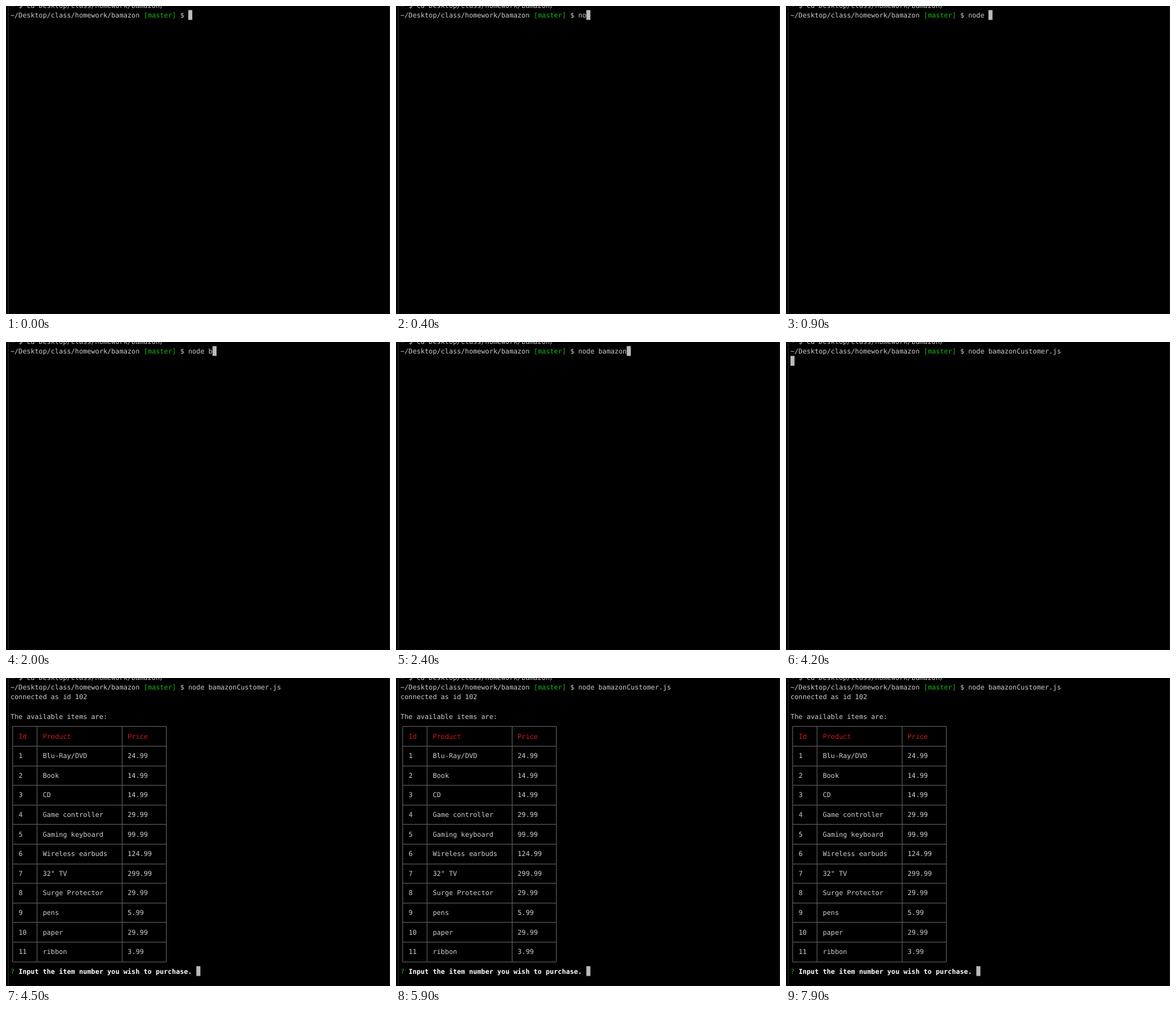
An HTML page that plays this animation: 600x481 px, repeating every 8000 ms.

```html
<!DOCTYPE html>
<html lang="en">
<head>
<meta charset="utf-8">
<title>Terminal session</title>
<style>
  html, body { margin: 0; width: 100%; height: 100%; overflow: hidden; background: #000; }
  svg { display: block; width: 600px; height: 481px; }
  text {
    font: 10.486px "DejaVu Sans Mono", "Liberation Mono", monospace;
    text-rendering: geometricPrecision;
    white-space: pre;
    fill: #cecece;
  }
  .green { fill: #14bf14; }
  .red { fill: #d41a12; }
  .bold { fill: #fff; font-weight: bold; }
  .grid { fill: none; stroke: #5e5e5e; }
</style>
</head>
<body>
<svg id="stage" viewBox="0 0 600 481">
  <rect width="600" height="481" fill="#000"/>
  <path d="M3.5 0V481" stroke="#2c2c2c"/>
  <path d="M599.5 0V481" stroke="#1c1a18"/>
  <path d="M0 480.5H600" stroke="#140404"/>
</svg>
<script>
const LOOP = 8000;
const LEFT = 7, CELL = 6.313, LINE = 15.3, TOP = 6.4, BASE = 18, MIDDLE = 14.2;
const PROMPT_COLS = 44;
const COMMAND = 'node bamazonCustomer.js ';
const ENTER = 4200, OUTPUT = 4500;

// [time, characters typed so far]
const KEYS = [[0, 0], [200, 1], [400, 2], [600, 3], [700, 4], [900, 5], [2000, 6],
  [2200, 7], [2400, 12], [3300, 13], [3400, 14], [3600, 24]];

const ITEMS = [
  ['Id', 'Product', 'Price'],
  ['1', 'Blu-Ray/DVD', '24.99'],
  ['2', 'Book', '14.99'],
  ['3', 'CD', '14.99'],
  ['4', 'Game controller', '29.99'],
  ['5', 'Gaming keyboard', '99.99'],
  ['6', 'Wireless earbuds', '124.99'],
  ['7', '32" TV', '299.99'],
  ['8', 'Surge Protector', '29.99'],
  ['9', 'pens', '5.99'],
  ['10', 'paper', '29.99'],
  ['11', 'ribbon', '3.99']
];
const BORDERS = [0, 6, 27, 38];
const TABLE_ROW = 4, QUESTION_ROW = 29;

const stage = document.getElementById('stage');
const colX = col => LEFT + col * CELL;
const snap = v => Math.round(v) + 0.5;

function add(parent, tag, attrs) {
  const el = document.createElementNS('http://www.w3.org/2000/svg', tag);
  for (const key in attrs) el.setAttribute(key, attrs[key]);
  return parent.appendChild(el);
}

function write(parent, row, col, string, style = '') {
  const el = add(parent, 'text', { x: colX(col), y: BASE + row * LINE, class: style });
  el.textContent = string;
  return el;
}

function drawTable(parent) {
  const xs = BORDERS.map(col => snap(colX(col + 0.5)));
  const ys = Array.from({ length: ITEMS.length + 1 },
    (_, i) => snap(MIDDLE + (TABLE_ROW + 2 * i) * LINE));
  const right = xs[xs.length - 1], bottom = ys[ys.length - 1];
  const d = ys.map(y => `M${xs[0]} ${y}H${right}`).join('') +
    xs.map(x => `M${x} ${ys[0]}V${bottom}`).join('');
  add(parent, 'path', { d, class: 'grid' });
  ITEMS.forEach((cells, i) => cells.forEach((cell, j) =>
    write(parent, TABLE_ROW + 1 + 2 * i, BORDERS[j] + 2, cell, i ? '' : 'red')));
}

write(stage, -1, 0, '~ $ cd Desktop/class/homework/bamazon/');
write(stage, 0, 0, '~/Desktop/class/homework/bamazon');
write(stage, 0, 33, '[master]', 'green');
write(stage, 0, 42, '$');
const command = write(stage, 0, PROMPT_COLS, '');

const output = add(stage, 'g', {});
write(output, 1, 0, 'connected as id 102');
write(output, 3, 0, 'The available items are:');
drawTable(output);
write(output, QUESTION_ROW, 0, '?', 'green');
write(output, QUESTION_ROW, 2, 'Input the item number you wish to purchase.', 'bold');

const cursor = add(stage, 'rect', { width: CELL, height: LINE, fill: '#bbb' });

function render(t) {
  const typed = KEYS.filter(key => key[0] <= t).pop()[1];
  let row = 0, col = PROMPT_COLS + typed;
  if (t >= OUTPUT) [row, col] = [QUESTION_ROW, 46];
  else if (t >= ENTER) [row, col] = [1, 0];
  command.textContent = COMMAND.slice(0, typed);
  output.style.display = t >= OUTPUT ? '' : 'none';
  cursor.setAttribute('x', colX(col));
  cursor.setAttribute('y', TOP + row * LINE);
}

const start = performance.now();
function tick() {
  render((performance.now() - start) % LOOP);
  requestAnimationFrame(tick);
}
tick();
</script>
</body>
</html>
```
